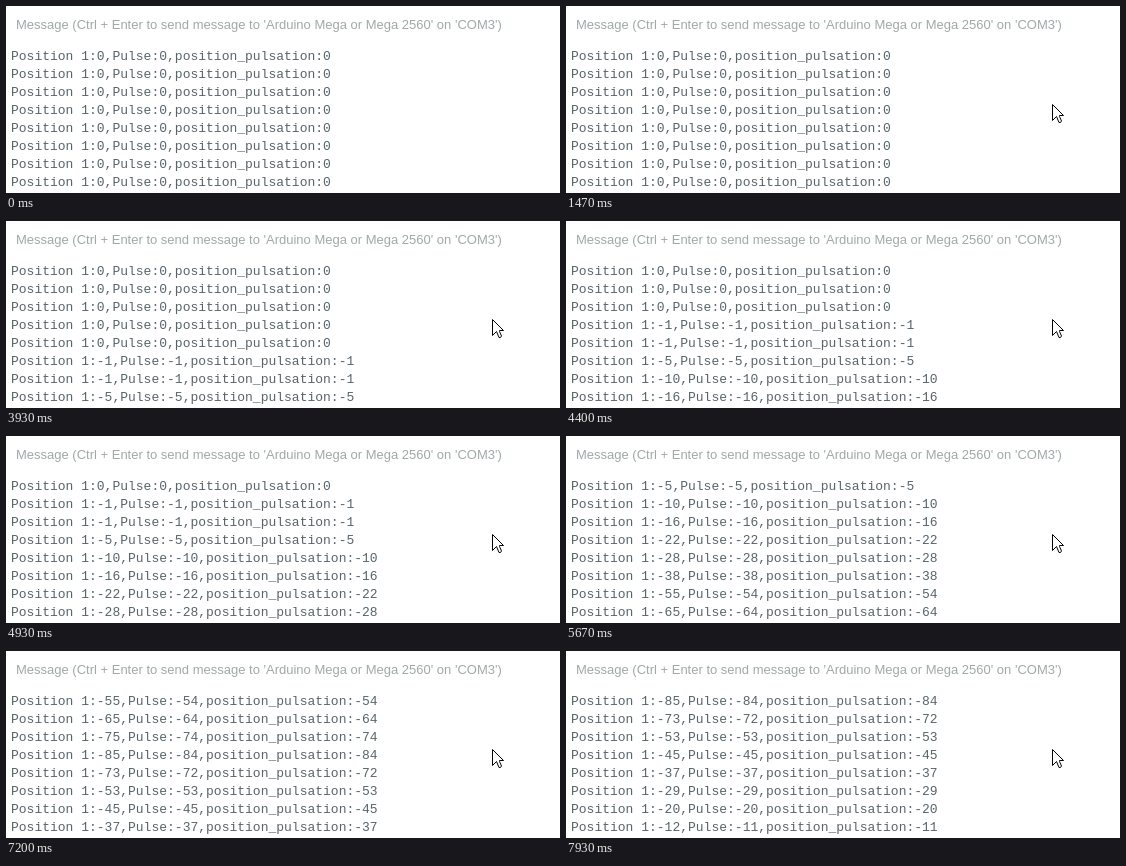
These frames come from a looping animation (554x187 px, 8000 ms). An HTML page:

```html
<!DOCTYPE html>
<html lang="en">
<head>
<meta charset="utf-8">
<title>Serial monitor</title>
<style>
  html, body { margin: 0; width: 100%; height: 100%; overflow: hidden; background: #fff; }
  svg { display: block; width: 554px; height: 187px; }
  .hint { font: 13px "Liberation Sans", Arial, sans-serif; fill: #9fa9a9; }
  .log { font: 13px "Liberation Mono", "Courier New", monospace; fill: #57646a; }
</style>
</head>
<body>
<svg viewBox="0 0 554 187" xmlns="http://www.w3.org/2000/svg">
  <rect width="554" height="187" fill="#fff"/>
  <text class="hint" x="10" y="23">Message (Ctrl + Enter to send message to 'Arduino Mega or Mega 2560' on 'COM3')</text>
  <g class="log" id="log"></g>
  <path id="cursor" d="M.5 .5V16.5L4.5 12.5L7 18.5H8.5L9.5 17L7.5 12.5V11.5H11.5Z"
        fill="#fff" stroke="#000" stroke-linejoin="round"/>
</svg>
<script>
const LOOP = 8000, ROWS = 8, LINE = 18;
const FIRST_READING = 3400, INTERVAL = 250, FPS = 15;
const CURSOR_IN = 1330, CURSOR_STEP = 70;

// Encoder turn: [reading index, angle], straight runs in between
const turn = [
  [-1, 0], [0, -1], [1, -1], [2, -4.6], [6, -28], [7, -38],
  [8, -55], [11, -85], [12, -73], [13, -53.1], [16, -29], [18, -11.55]
];
const PULSES_PER_UNIT = 0.99;

function angleAt(n) {
  const next = turn.findIndex(([at]) => at >= n);
  if (next < 1) return turn[0][1];
  const [n0, a0] = turn[next - 1], [n1, a1] = turn[next];
  return a0 + (a1 - a0) * (n - n0) / (n1 - n0);
}

function lineAt(n) {
  const angle = angleAt(n), pulse = Math.round(angle * PULSES_PER_UNIT);
  return `Position 1:${Math.round(angle)},Pulse:${pulse},position_pulsation:${pulse}`;
}

// Readings show up on the next screen refresh, timed to 10 ms
function arrival(n) {
  const refresh = Math.ceil((FIRST_READING + n * INTERVAL) * FPS / 1000);
  return Math.round(refresh * 100 / FPS) * 10;
}

function latestReading(t) {
  let n = -1;
  while (arrival(n + 1) <= t) n++;
  return n;
}

const log = document.getElementById("log");
const cursor = document.getElementById("cursor");
const rows = Array.from({ length: ROWS }, (_, i) => {
  const row = document.createElementNS("http://www.w3.org/2000/svg", "text");
  row.setAttribute("x", 5);
  row.setAttribute("y", 54 + i * LINE);
  return log.appendChild(row);
});

function render(t) {
  const latest = latestReading(t);
  rows.forEach((row, i) => {
    const text = lineAt(latest - (ROWS - 1 - i));
    if (row.textContent !== text) row.textContent = text;
  });

  // Glides in and settles in two steps
  const step = Math.min(2, Math.floor((t - CURSOR_IN) / CURSOR_STEP));
  const left = (1 - step / 2) ** 2;
  cursor.setAttribute("visibility", step < 0 ? "hidden" : "visible");
  cursor.setAttribute("transform",
    `translate(${Math.round(486 + 32 * left)} ${Math.round(98 + 5 * left)})`);
}

const start = performance.now();
function tick() {
  render((performance.now() - start) % LOOP);
  requestAnimationFrame(tick);
}
tick();
</script>
</body>
</html>
```
